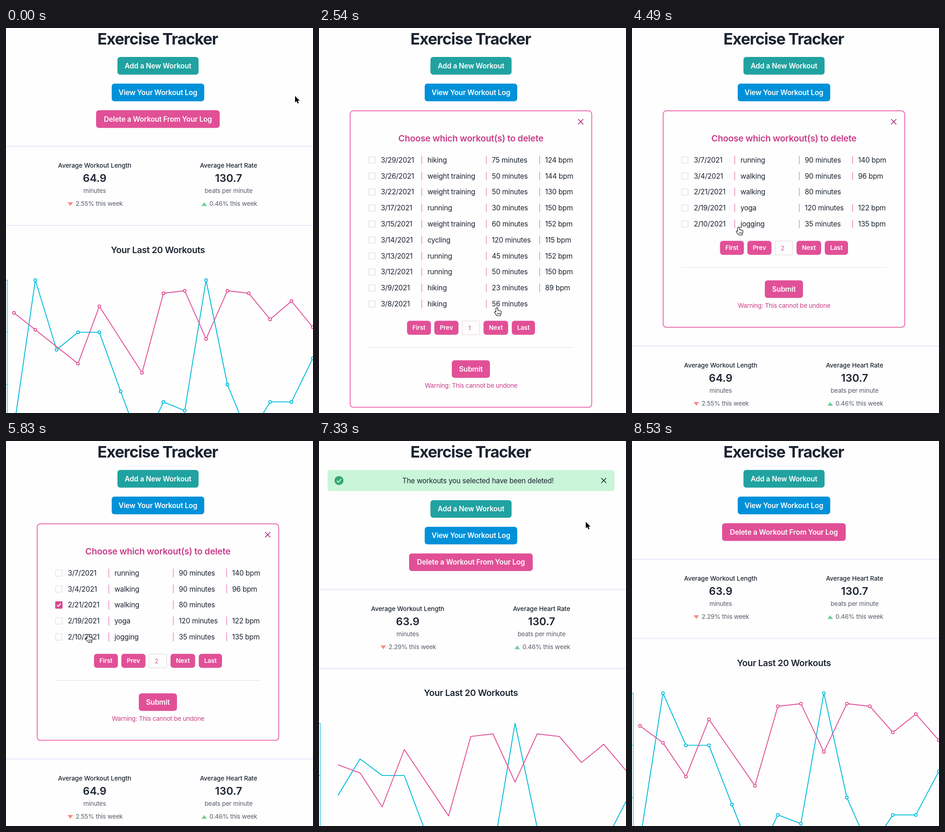
An HTML page with a canvas for the animation above (9.43 s loop, 668 px wide and 838 px high).

```html
<!DOCTYPE html>
<html lang="en">
<head>
<meta charset="utf-8">
<title>Exercise Tracker</title>
<style>
  html, body { margin: 0; width: 100%; height: 100%; overflow: hidden; background: #fefefe; }
  canvas { display: block; }
</style>
</head>
<body>
<canvas id="stage" width="668" height="838"></canvas>
<script>
const ctx = document.getElementById('stage').getContext('2d');
const LOOP = 9430, FIRST = 300, STEP = 149.6;
const INK = '#1a2330', GRAY = '#565d68', PINK = '#e15097', DARK_PINK = '#aa357b',
      ROSE = '#c93b87', BORDER = '#ec70af', CYAN = '#00bcdc', RULE = '#eee9fc';

// Newest first: date, activity, minutes, heart rate.
const workouts = [
  ['3/29/2021', 'hiking', 75, 124], ['3/26/2021', 'weight training', 50, 144],
  ['3/22/2021', 'weight training', 50, 130], ['3/17/2021', 'running', 30, 150],
  ['3/15/2021', 'weight training', 60, 152], ['3/14/2021', 'cycling', 120, 115],
  ['3/13/2021', 'running', 45, 152], ['3/12/2021', 'running', 50, 150],
  ['3/9/2021', 'hiking', 23, 89], ['3/8/2021', 'hiking', 56, 0],
  ['3/7/2021', 'running', 90, 140], ['3/4/2021', 'walking', 90, 96],
  ['2/21/2021', 'walking', 80, 0], ['2/19/2021', 'yoga', 120, 122],
  ['2/10/2021', 'jogging', 35, 135]
];

// Moments of the story, counted in screen updates.
const OPEN = 8, NEXT_PAGE = 22, CHECK = 35, SUBMIT = 43, DELETED = 45, DISMISS = 52;
const MORPH_START = 6900, MORPH_TIME = 1500;

// Pointer path: update, x, y.
const path = [
  [0, 629, 148], [7, 440, 196], [8, 441, 200], [10, 441, 200], [11, 428, 270],
  [12, 404, 400], [13, 387, 510], [14, 402, 556], [15, 402, 556], [16, 387, 609.5],
  [17, 396, 642], [18, 400, 657], [19, 400, 657], [20, 399, 658], [21, 399, 658],
  [28, 261, 454], [29, 232, 434], [34, 115, 354], [36, 115, 354], [42, 306, 556],
  [43, 306, 559], [48, 580.5, 176], [50, 619, 81], [51, 619, 81], [55, 690, 100]
];
const handSpans = [[7, 7], [12, 21], [28, 38], [42, 42], [50, 51]];

const lerp = (a, b, p) => a + (b - a) * p;
const clamp = p => Math.max(0, Math.min(1, p));

// CSS "ease": cubic-bezier(.25, .1, .25, 1)
function ease(p) {
  const bezier = (a, b, s) => 3 * a * s * (1 - s) ** 2 + 3 * b * s * s * (1 - s) + s ** 3;
  let low = 0, high = 1;
  for (let i = 0; i < 24; i++) {
    const mid = (low + high) / 2;
    if (bezier(.25, .25, mid) < p) low = mid; else high = mid;
  }
  return bezier(.1, 1, low);
}

// y is the middle of the capitals.
function text(label, x, y, size, { color = INK, weight = 400, align = 'center', track = -.015 } = {}) {
  ctx.font = `${weight} ${size}px Inter, sans-serif`;
  ctx.letterSpacing = size * track + 'px';
  ctx.textAlign = align;
  ctx.fillStyle = color;
  ctx.fillText(label, x, y + size * .3635);
}

function box(x, y, w, h, r, fill, stroke, width = 2) {
  ctx.beginPath();
  ctx.roundRect(x, y, w, h, r);
  if (fill) { ctx.fillStyle = fill; ctx.fill(); }
  if (stroke) { ctx.strokeStyle = stroke; ctx.lineWidth = width; ctx.stroke(); }
}

function rect(x, y, w, h, color) {
  ctx.fillStyle = color;
  ctx.fillRect(x, y, w, h);
}

function polyline(points, color, width) {
  ctx.beginPath();
  points.forEach(([x, y]) => ctx.lineTo(x, y));
  ctx.strokeStyle = color;
  ctx.lineWidth = width;
  ctx.lineJoin = 'round';
  ctx.stroke();
}

function cross(x, y, r, color) {
  polyline([[x - r, y - r], [x + r, y + r]], color, 1.6);
  polyline([[x + r, y - r], [x - r, y + r]], color, 1.6);
}

function button(label, x, y, w, h, color, size = 15.4) {
  box(x, y, w, h, 6, color);
  text(label, x + w / 2, y + h / 2, size, { color: '#fff', weight: 600, track: -.009 });
}

function alertBar() {
  box(18.5, 63, 624.5, 46, 6, '#c9f5d9');
  ctx.beginPath();
  ctx.arc(43.5, 86, 9.8, 0, 7);
  ctx.fillStyle = '#35a870';
  ctx.fill();
  polyline([[39, 86.5], [42.3, 89.7], [48.3, 82.8]], '#c9f5d9', 2);
  text('The workouts you selected have been deleted!', 346, 86, 15.4);
  cross(619.5, 86, 5.3, INK);
}

function panel(tick) {
  const page = tick >= NEXT_PAGE ? 2 : 1;
  const rows = page === 1 ? workouts.slice(0, 10) : workouts.slice(10);
  const drop = (rows.length - 10) * 34.8;
  box(67.8, 180.3, 525.6, 645.2 + drop, 7, null, BORDER);
  cross(569.5, 204, 5.6, DARK_PINK);
  text('Choose which workout(s) to delete', 330.5, 240, 19.3, { color: ROSE, weight: 600, track: -.014 });

  rows.forEach(([date, activity, minutes, bpm], i) => {
    const y = 287.3 + 34.8 * i;
    const cell = (label, x) => text(label, x, y, 15.4, { align: 'left' });
    if (tick >= CHECK && date === '2/21/2021') {
      box(107, y - 8, 16, 16, 2, '#d8478f');
      polyline([[111, y + .3], [114, y + 3], [119, y - 3.3]], '#fff', 2);
    } else {
      box(108, y - 7, 14, 14, 1.5, null, '#e2e8f2', 1.8);
    }
    cell(date, 134.5);
    cell(activity, 236);
    cell(minutes + ' minutes', 376);
    if (bpm) cell(bpm + ' bpm', 492);
    [223, 363.5, 479.5].slice(0, bpm ? 3 : 2).forEach(x => rect(x, y - 9.5, 1.2, 19, BORDER));
  });

  ctx.save();
  ctx.translate(0, drop);
  const nextColor = tick >= 17 && page === 1 ? DARK_PINK : PINK;
  button('First', 191.5, 637.3, 52, 30.5, PINK, 13.5);
  button('Prev', 251, 637.3, 52.5, 30.5, PINK, 13.5);
  box(311.5, 637.8, 38, 30, 1, '#fefefe', '#e2d3e0', 1);
  text(page, 327.5, 653, 13.5, { color: PINK });
  button('Next', 358, 637.3, 53.5, 30.5, nextColor, 13.5);
  button('Last', 419.5, 637.3, 50.5, 30.5, PINK, 13.5);
  rect(107, 694.8, 447, 1, '#e0e1e7');
  button('Submit', 289, 723.2, 83, 38.3, tick === SUBMIT - 1 ? DARK_PINK : PINK);
  text('Warning: This cannot be undone', 331, 778, 13.5, { color: ROSE });
  ctx.restore();
}

function stat(x, title, value, unit, change, rising) {
  text(title, x, 299, 13.5, { weight: 500, track: -.001 });
  text(value, x, 326.5, 23.1, { weight: 600, track: 0 });
  text(unit, x, 354, 13.5, { color: GRAY });
  text(change + ' this week', x - 41.5, 382, 13.5, { color: GRAY, align: 'left' });
  const tip = rising ? 379.3 : 387.5, base = rising ? 387.5 : 379.3;
  ctx.beginPath();
  ctx.moveTo(x - 59, base);
  ctx.lineTo(x - 47, base);
  ctx.lineTo(x - 53, tip);
  ctx.fillStyle = rising ? '#6fd09b' : '#fb8b87';
  ctx.fill();
}

function chartPoints(time, deleted) {
  const place = list => list.map((w, i) =>
    ({ x: 17.3 + 650.3 * i / (list.length - 1), minutes: w[2], bpm: w[3] }));
  const before = place([...workouts].reverse());
  if (!deleted) return before;
  const after = place(workouts.filter(w => w[0] !== '2/21/2021').reverse());
  const p = ease(clamp((time - MORPH_START) / MORPH_TIME));
  return after.map((to, i) => {
    const from = before[i + 1];
    return {
      x: lerp(from.x, to.x, p),
      minutes: lerp(from.minutes, to.minutes, p),
      bpm: from.bpm && to.bpm ? lerp(from.bpm, to.bpm, p) : to.bpm
    };
  });
}

function chart(time, tick) {
  const deleted = tick >= DELETED, hovering = tick === SUBMIT;
  const showDots = !deleted || time >= MORPH_START + MORPH_TIME;
  const points = chartPoints(time, deleted);
  const top = 548.8, minuteScale = 3.787;
  rect(2.2, top - .5, 1.2, 460, CYAN);
  for (let i = 0; i < 3; i++) rect(0, top - .5 + i * 30 * minuteScale, 3, 1.2, CYAN);
  if (hovering) rect(295.8, top, 1, 460, '#ccc');

  const series = [
    [CYAN, points.map(p => [p.x, top + (120 - p.minutes) * minuteScale])],
    [PINK, points.filter(p => p.bpm).map(p => [p.x, 571.8 + (152 - p.bpm) * 2.835])]
  ];
  series.forEach(([color, line]) => {
    polyline(line, color, 1.9);
    if (showDots) line.forEach(([x, y]) => {
      const active = hovering && Math.abs(x - 296) < 1;
      ctx.beginPath();
      ctx.arc(x, y, 3, 0, 7);
      ctx.fillStyle = active ? color : '#fff';
      ctx.strokeStyle = active ? '#fff' : color;
      ctx.lineWidth = active ? 1.2 : 1.8;
      ctx.fill();
      ctx.stroke();
    });
  });

  if (hovering) {
    box(482.2, 686.2, 126, 141.5, 6, '#faf6fe', '#6e58c2', 1.9);
    [['March 9, 2021', '#343b47'], ['hiking', '#343b47'], ['23 minutes', CYAN], ['89 bpm', PINK]]
      .forEach(([label, color], i) => text(label, 545, 711 + 31 * i, 15.4, { color }));
  }
}

const arrow = new Path2D('M0 0V14L3.3 11 5.6 16.3 8 15.3 5.8 10.2H10.2Z');
const hand = new Path2D('M-1.6 9.5V1.6a1.6 1.6 0 0 1 3.2 0V6q1.6-1 2.6 .4 1.6-.8 2.5 .5 2-.5 2.2 1.4 .2 4-1.5 6V16.2H1Q-1 14-4 10.5-5 8.6-3.4 8.2Z');
const fingers = new Path2D('M1.7 10.5v3.5M4 10.5v3.5M6.3 10.5v3.5');
const beam = new Path2D('M-3-8Q0-8 0-6 0-8 3-8M0-6V6M-3 8Q0 8 0 6 0 8 3 8M-1.8 2H1.8');

function pointer(tick) {
  if (tick >= 55) return;
  const next = Math.max(1, path.findIndex(p => p[0] >= tick));
  const [t0, x0, y0] = path[next - 1], [t1, x1, y1] = path[next];
  const p = (tick - t0) / (t1 - t0);
  ctx.save();
  ctx.translate(lerp(x0, x1, p), lerp(y0, y1, p));
  const draw = (shape, color, width) => {
    ctx.strokeStyle = color;
    ctx.lineWidth = width;
    ctx.stroke(shape);
  };
  if (tick === SUBMIT) {
    draw(beam, '#fff', 3);
    draw(beam, '#111', 1.3);
  } else if (handSpans.some(([from, to]) => tick >= from && tick <= to)) {
    draw(hand, '#111', 2.3);
    ctx.fillStyle = '#fff';
    ctx.fill(hand);
    draw(fingers, '#111', 1);
  } else {
    draw(arrow, '#fff', 2);
    ctx.fillStyle = '#000';
    ctx.fill(arrow);
  }
  ctx.restore();
}

function render(now) {
  // The screen refreshes in even steps after an opening pause.
  const tick = Math.max(0, Math.floor((now % LOOP - FIRST + 10) / STEP) + 1);
  const time = FIRST + (tick - 1) * STEP;
  const panelOpen = tick >= OPEN && tick < SUBMIT;
  const deleted = tick >= DELETED;
  const alerted = deleted && tick < DISMISS;

  rect(0, 0, 668, 838, '#fefefe');
  text('Exercise Tracker', 330, 23.7, 34.3, { weight: 700, track: -.031 });
  if (alerted) alertBar();

  ctx.save();
  ctx.translate(0, alerted ? 65.7 : 0);
  button('Add a New Workout', 242.5, 63, 176.5, 38.4, '#20a2a0');
  button('View Your Workout Log', 230, 121, 201.3, 38.4, '#0091d9');
  if (panelOpen) panel(tick);
  else button('Delete a Workout From Your Log', 196, 179, 269, 38.4, tick === OPEN - 1 ? DARK_PINK : PINK);

  if (panelOpen) ctx.translate(0, tick < NEXT_PAGE ? 608.7 : 434.7);
  rect(0, 256.4, 668, 2.4, RULE);
  stat(193, 'Average Workout Length', deleted ? '63.9' : '64.9', 'minutes', deleted ? '2.29%' : '2.55%', false);
  stat(484.3, 'Average Heart Rate', '130.7', 'beats per minute', '0.46%', true);
  rect(0, 428.6, 668, 2.4, RULE);
  text('Your Last 20 Workouts', 330.5, 482.5, 19.3, { weight: 600, track: -.017 });
  chart(time, tick);
  ctx.restore();

  pointer(tick);
}

const start = performance.now();
function loop() {
  render(performance.now() - start);
  requestAnimationFrame(loop);
}
loop();
</script>
</body>
</html>
```
